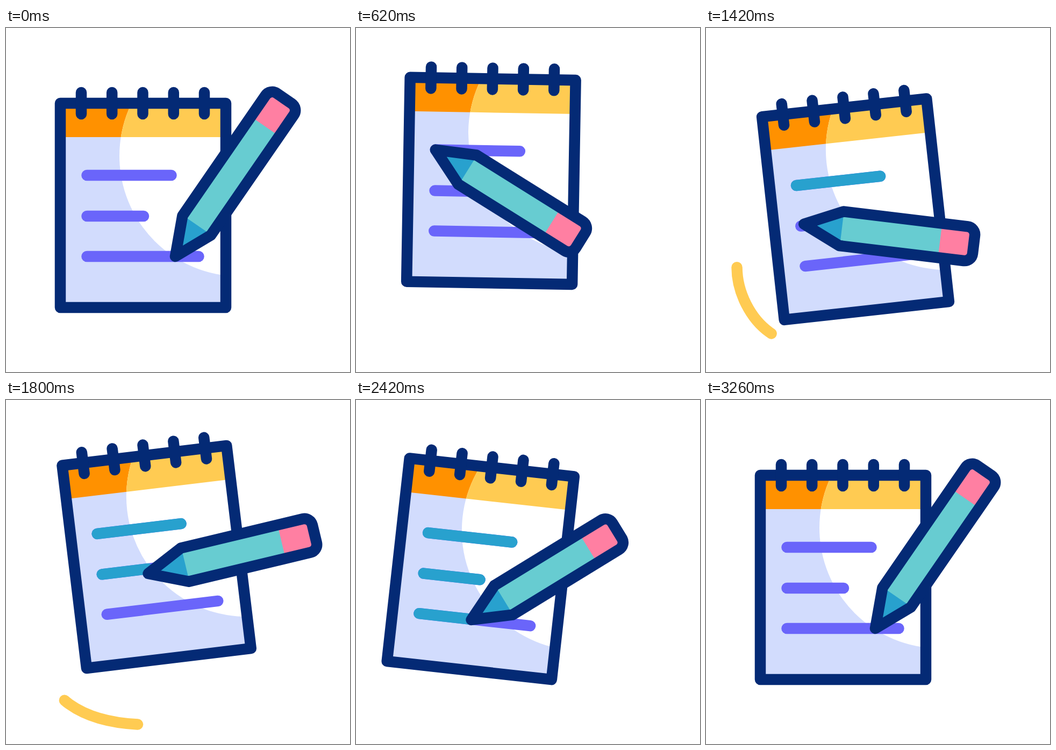
Recreate the animation shown at these times as an HTML page. Size 640 by 640 pixels, loop 3560 ms.

```html
<!DOCTYPE html>
<html lang="en">
<head>
<meta charset="utf-8">
<title>Notepad and pencil</title>
<style>
  html, body { margin: 0; width: 100%; height: 100%; overflow: hidden; background: #fff; }
  svg { display: block; width: 100vw; height: 100vh; }
  .line { fill: none; stroke-width: 20.5; stroke-linecap: round; stroke-linejoin: round; }
  .navy { stroke: #042a75; }
  .violet { stroke: #6a65fa; }
  .blue { stroke: #28a1ce; }
</style>
</head>
<body>
<svg viewBox="0 0 640 640">
  <defs>
    <clipPath id="page"><rect x="101" y="140" width="308" height="380"/></clipPath>
    <clipPath id="glow"><circle cx="435" cy="238" r="224"/></clipPath>
  </defs>
  <path id="swoosh" class="line" stroke="#ffcb52"
    d="M57.5 445C57.5 492 83 541 118 566C153 591 197 601 245 603.500"/>
  <g id="pad">
    <g clip-path="url(#page)">
      <path fill="#d2dcfd" d="M101 140h308v380h-308z"/>
      <path fill="#ff9100" d="M101 140h308v63h-308z"/>
      <g clip-path="url(#glow)">
        <path fill="#fff" d="M101 140h308v380h-308z"/>
        <path fill="#ffcb52" d="M101 140h308v63h-308z"/>
      </g>
    </g>
    <path class="line navy" d="M101 140h308v380h-308z"/>
    <path class="line navy" d="M140 120v40M197.200 120v40M254.500 120v40M311.800 120v40M369 120v40"/>
    <g id="rows"></g>
    <g id="pencil">
      <path id="body" fill="#67ccd1"/>
      <path fill="#28a1ce" d="M0 0L71 -32V32z"/>
      <path id="eraser" fill="#ff7fa2"/>
      <path id="edge" class="line navy"/>
    </g>
  </g>
</svg>
<script>
const LOOP = 3560;
const $ = id => document.getElementById(id);

// Rows of writing: y, right end, drop of the tip by then, time the pencil starts and stops
const LEFT = 150.5;
const rows = [
  { y: 274, end: 307.5, drop: 0, from: 720, to: 1245 },
  { y: 350, end: 256, drop: 11, from: 1447, to: 1944 },
  { y: 425, end: 358.5, drop: 2, from: 2190, to: 2670 }
];

// Tables of [time, value, optional power that shifts the easing]
const turn = [[500, 0], [1000, 7.16], [1500, -7.16], [1755, -7.16], [2265, 7.16], [2980, 0]];
const lift = [[220, 0], [680, -47.5], [1300, 13], [1980, -46], [2690, 0]];
const angle = [[220, -55.4], [620, 31], [720, 31], [1245, 27.5], [1447, 12.6],
  [1944, -11.1], [2190, -28.8], [2670, -48], [3260, -55.4, 0.55]];
const length = [[220, 357], [620, 318], [2670, 318], [3260, 357, 0.55]];
const tipX = [[220, 315], [620, LEFT]];
const tipY = [[220, 425], [620, rows[0].y]];
for (const r of rows) {
  tipX.push([r.from, LEFT], [r.to, r.end]);
  tipY.push([r.from, r.y], [r.to, r.y + r.drop]);
}
tipX.push([3260, 315, 0.55]);
tipY.push([3260, 425, 0.55]);
const fade = [[2900, 1], [3260, 0]];

const ease = p => (1 - Math.cos(Math.PI * p)) / 2;
const ratio = (t, a, b) => Math.min(1, Math.max(0, (t - a) / (b - a)));

function at(keys, t) {
  let prev = keys[0];
  for (const key of keys) {
    if (t < key[0]) {
      if (key === prev) return key[1];
      const p = ratio(t, prev[0], key[0]) ** (key[2] || 1);
      return prev[1] + (key[1] - prev[1]) * ease(p);
    }
    prev = key;
  }
  return prev[1];
}

function addLine(kind) {
  const path = document.createElementNS("http://www.w3.org/2000/svg", "path");
  path.setAttribute("class", "line " + kind);
  $("rows").append(path);
  return path;
}

for (const r of rows) {
  addLine("violet").setAttribute("d", `M${LEFT} ${r.y}H${r.end}`);
  r.ink = addLine("blue");
}

const swooshSize = $("swoosh").getTotalLength();

function drawSwoosh(t) {
  const head = swooshSize * ratio(t, 1000, 1800);
  const tail = swooshSize * ratio(t, 1420, 2235);
  const size = head - tail;
  const style = $("swoosh").style;
  style.visibility = size > 0.5 ? "visible" : "hidden";
  style.strokeDasharray = `${size} 1000`;
  style.strokeDashoffset = -tail;
}

function drawPencil(t, x) {
  const len = at(length, t);
  const shape = `M0 0L70 -32H${len - 15}a15 15 0 0 1 15 15v34a15 15 0 0 1 -15 15H70z`;
  $("body").setAttribute("d", shape);
  $("edge").setAttribute("d", shape);
  $("eraser").setAttribute("d", `M${len - 63} -32H${len}V32H${len - 63}z`);
  $("pencil").setAttribute("transform",
    `translate(${x} ${at(tipY, t)}) rotate(${at(angle, t)})`);
}

function draw(t) {
  const x = at(tipX, t);
  $("pad").setAttribute("transform",
    `translate(0 ${at(lift, t)}) rotate(${at(turn, t)} 254.5 120)`);
  for (const r of rows) {
    const stop = t < r.to ? x : r.end;
    r.ink.setAttribute("d", `M${LEFT} ${r.y}H${stop}`);
    r.ink.style.visibility = t > r.from && t < 3260 ? "visible" : "hidden";
    r.ink.style.opacity = at(fade, t);
  }
  drawPencil(t, x);
  drawSwoosh(t);
}

const start = performance.now();
function tick() {
  draw((performance.now() - start) % LOOP);
  requestAnimationFrame(tick);
}
tick();
</script>
</body>
</html>
```
